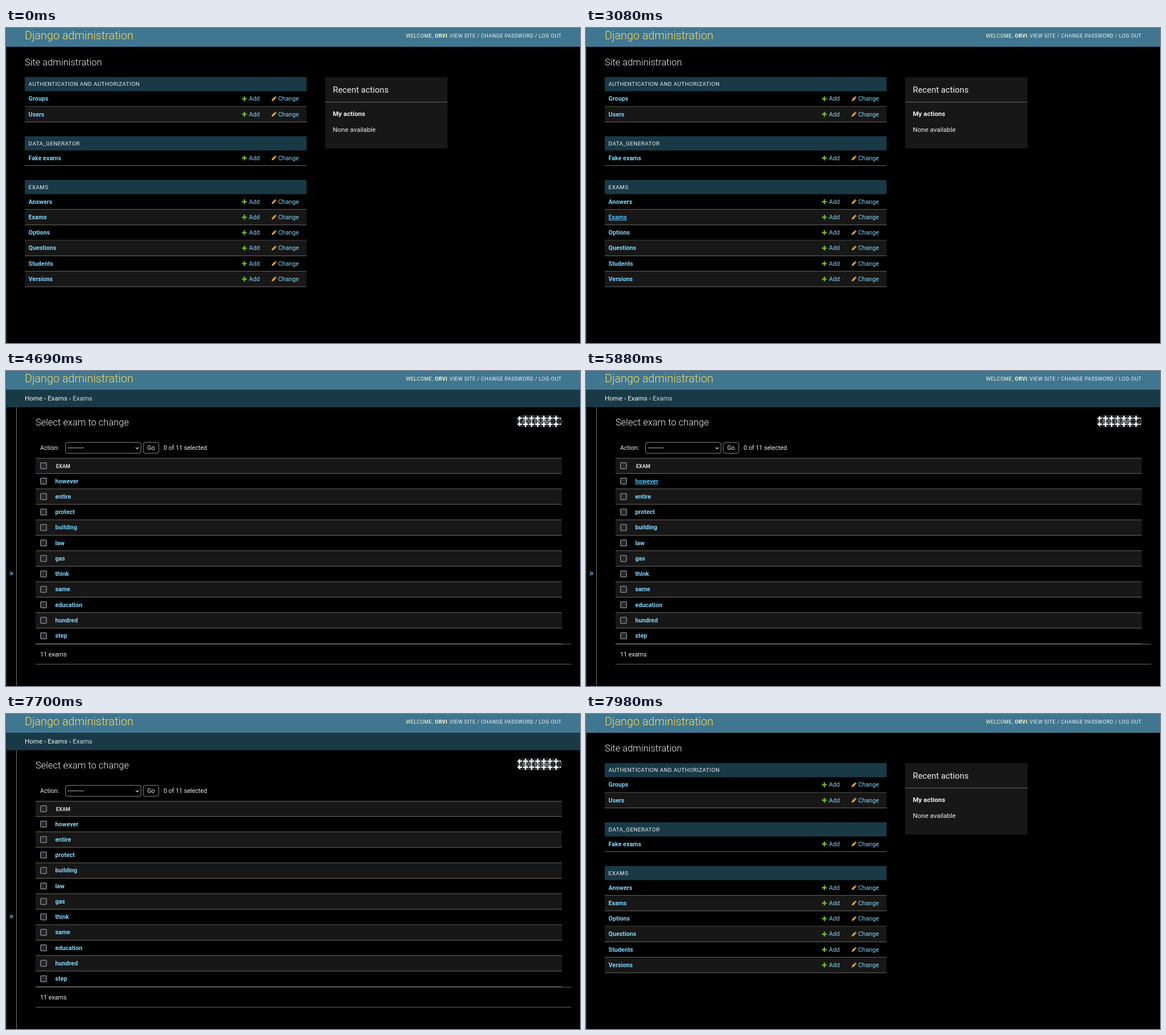
An HTML page that plays this animation: 1009x555 px, repeating every 8 s.

```html
<!DOCTYPE html>
<html lang="en">
<head>
<meta charset="utf-8">
<title>Exam admin</title>
<style>
html, body { margin: 0; width: 100%; height: 100%; overflow: hidden; background: #000; }
svg { display: block; width: 1009px; height: 555px; }
text { font-family: Roboto, "Liberation Sans", sans-serif; white-space: pre; }
</style>
</head>
<body>
<svg id="stage" viewBox="0 0 1009 555"></svg>
<script>
const K = 0.8258; // page zoom
const ROW = 33 * K;
const C = {
  text: '#eeeeee', link: '#81d4fa', linkHot: '#4ac1f7', line: '#77736a',
  edge: '#8c8c8c', bar: '#417690', dark: '#1a3947', panel: '#171717',
  crumb: '#f7f7f7', crumbHot: '#c4dce8', accent: '#f5dd5d', cream: '#ffffcc'
};
const stage = document.getElementById('stage');

function el(parent, tag, attrs = {}, content) {
  const node = document.createElementNS('http://www.w3.org/2000/svg', tag);
  for (const key in attrs) node.setAttribute(key, attrs[key]);
  if (content !== undefined) node.textContent = content;
  parent.appendChild(node);
  return node;
}
const group = () => el(stage, 'g');
const rect = (g, x, y, width, height, fill, more = {}) =>
  el(g, 'rect', { x, y, width, height, fill, ...more });
const path = (g, d, stroke, width = 1, more = {}) =>
  el(g, 'path', { d, stroke, 'stroke-width': width, fill: 'none', ...more });
const hline = (g, x1, x2, y) => rect(g, x1, y - 0.45, x2 - x1, 0.9, C.line);
// size is in page pixels, before zoom
const text = (g, x, y, str, size = 13, weight = 400, fill = C.text, more = {}) =>
  el(g, 'text', { x, y, 'font-size': size * K, 'font-weight': weight, fill, ...more }, str);
const spaced = { 'letter-spacing': 0.5 * K };
const span = (t, str, fill, weight = 400) => el(t, 'tspan', { fill, 'font-weight': weight }, str);
const field = (g, x, y, w, h) => rect(g, x, y, w, h, '#000', { rx: 3.3, stroke: C.edge });

function plus(g, x, y, r, width, color) {
  return path(g, `M${x - r} ${y}h${2 * r}M${x} ${y - r}v${2 * r}`, color, width);
}

function pencil(g, x, y) {
  const p = el(g, 'g', { transform: `translate(${x} ${y}) rotate(45)`, fill: '#efb13c' });
  el(p, 'path', { d: 'M-1.7-5.2h3.4v1.5h-3.4zM-1.7-3.1h3.4v5.6L0 5.6l-1.7-3.1z' });
  el(p, 'path', { d: 'M-.3-2.4v5', stroke: '#8a5f14', 'stroke-width': 0.6 });
}

function header() {
  const g = group();
  rect(g, 0, 0, 1009, 33.2, C.bar);
  text(g, 33, 20.3, 'Django administration', 24, 300, C.accent);
  const hello = text(g, 703, 16.8, '', 11, 400, C.cream, spaced);
  span(hello, 'WELCOME, ', C.cream);
  span(hello, 'ORVI', C.cream, 700);
  span(hello, '.', C.cream);
  const tools = text(g, 976.6, 16.8, '', 11, 300, C.crumb, { ...spaced, 'text-anchor': 'end' });
  ['VIEW SITE', 'CHANGE PASSWORD', 'LOG OUT'].forEach((name, i) => {
    if (i) span(tools, ' / ', C.cream);
    span(tools, name, '#eef3f5');
  });
  rect(g, 0, 33.2, 1, 522, '#3a3a3a');
}

function indexPage() {
  const g = group(), links = {};
  text(g, 33, 65.6, 'Site administration', 20, 300);
  let y = 86.4;
  const apps = [
    ['AUTHENTICATION AND AUTHORIZATION', 'Groups', 'Users'],
    ['DATA_GENERATOR', 'Fake exams'],
    ['EXAMS', 'Answers', 'Exams', 'Options', 'Questions', 'Students', 'Versions']
  ];
  for (const [title, ...models] of apps) {
    rect(g, 33, y, 495.4, 25, C.dark);
    text(g, 39.6, y + 15.9, title, 12, 400, C.text, spaced);
    y += 25;
    models.forEach((name, i) => {
      if (i % 2) rect(g, 33, y, 495.4, ROW, C.panel);
      hline(g, 33, 528.4, y + ROW - 0.4);
      const base = y + 16.9;
      links[name] = text(g, 39.6, base, name, 13, 700, C.link);
      plus(g, 419, y + 13.3, 4.2, 2.3, '#70bf2b');
      text(g, 427, base, 'Add', 13, 400, C.link);
      pencil(g, 470.8, y + 13.6);
      text(g, 478.5, base, 'Change', 13, 400, C.link);
      y += ROW;
    });
    y += 24.8;
  }
  rect(g, 561, 86.4, 215, 125.8, C.panel);
  text(g, 574.5, 113.7, 'Recent actions', 18);
  hline(g, 561, 776, 130.6);
  text(g, 574.5, 155.2, 'My actions', 14, 700);
  text(g, 574.5, 183.2, 'None available', 14);
  return { g, links };
}

// breadcrumb bar, collapsed sidebar and title shared by the inner pages
function innerPage(title, ...trail) {
  const g = group(), links = {};
  rect(g, 0, 33.2, 1009, 30.6, C.dark);
  const bar = text(g, 33, 52.4, '', 14);
  trail.forEach((name, i) => {
    if (i) span(bar, ' › ', C.crumbHot);
    const crumb = span(bar, name, i < trail.length - 1 ? C.crumb : C.crumbHot);
    if (!i) links[name] = crumb;
  });
  rect(g, 18, 63.8, 1, 492, C.line);
  text(g, 9.3, 361, '»', 20, 400, C.link, { 'text-anchor': 'middle' });
  text(g, 52, 96, title, 20, 300);
  return { g, links };
}

function addButton(g) {
  const clip = el(el(stage, 'defs'), 'clipPath', { id: 'pill' });
  rect(clip, 897.5, 78, 79.5, 21, '#000', { rx: 10.5 });
  rect(g, 897.5, 78, 79.5, 21, '#25292b', { rx: 10.5 });
  const tiles = el(g, 'g', { 'clip-path': 'url(#pill)' });
  for (let i = 0; i < 8; i++)
    for (let j = 0; j < 2; j++)
      plus(tiles, 902.5 + 13 * K * i, 83.2 + 13 * K * j, 4.5, 2.3, '#fff');
  text(g, 907, 91.9, 'ADD EXAM', 11, 400, '#c4c4c4', spaced);
}

const checkbox = (g, y) =>
  rect(g, 60.7, y - 5.4, 10.6, 10.8, '#26262a', { rx: 1.6, stroke: '#8d9095', 'stroke-width': 1.3 });

function listPage() {
  const page = innerPage('Select exam to change', 'Home', 'Exams', 'Exams');
  const { g, links } = page;
  addButton(g);
  text(g, 60, 139, 'Action:');
  field(g, 104.7, 125.8, 132.6, 19.2);
  text(g, 108.3, 138.8, '---------', 14);
  path(g, 'M228.1 134.6l2.5 2.6 2.5-2.6', C.text, 1.2);
  field(g, 241.3, 125.8, 27.3, 19.2);
  text(g, 255, 139, 'Go', 13, 400, C.text, { 'text-anchor': 'middle' });
  text(g, 277, 138.8, '0 of 11 selected');

  rect(g, 52, 153.6, 925, ROW, C.panel);
  hline(g, 52, 977, 153.8);
  checkbox(g, 167);
  text(g, 88, 170.6, 'EXAM', 11, 700, '#dcdcdc');
  const names = ['however', 'entire', 'protect', 'building', 'law', 'gas', 'think',
    'same', 'education', 'hundred', 'step'];
  names.forEach((name, i) => {
    const y = 180.75 + ROW * i;
    if (i % 2) rect(g, 52, y, 925, ROW, C.panel);
    hline(g, 52, 977, y - 0.3);
    const box = checkbox(g, y + 13.3);
    if (name === 'gas') page.hotBox = box;
    links[name] = text(g, 86.5, y + 16.9, name, 13, 700, C.link);
  });
  hline(g, 52, 977, 480.2);
  hline(g, 52, 993.5, 481.3);
  text(g, 60, 502.6, '11 exams');
  hline(g, 52, 993.5, 516.6);
  return page;
}

function editPage() {
  const page = innerPage('Change exam', 'Home', 'Exams', 'Exams', 'however');
  const { g } = page;
  const mid = { 'text-anchor': 'middle' };
  rect(g, 917.3, 100, 59.6, 21.4, '#25292b', { rx: 10.7 });
  text(g, 927, 114, 'HISTORY', 11, 400, C.text, spaced);
  text(g, 52, 128.7, 'however', 16, 700);

  text(g, 60, 164, 'Name:', 13, 700);
  field(g, 200.8, 147.4, 225.6, 22.4);
  text(g, 206.2, 162.3, 'however');
  text(g, 60, 206, 'Duration:', 13, 700);
  field(g, 200.8, 189.4, 64.6, 22.4);
  text(g, 206.2, 204.4, '115');
  rect(g, 245.5, 193.3, 14, 15, '#3a3a3d', { rx: 1.5 });
  path(g, 'M250 198.6l2.5-2.6 2.5 2.6M250 203.1l2.5 2.6 2.5-2.6', '#d5d5d5', 1.1);
  [['Backspace allowed', 239.8], ['Active', 275.7]].forEach(([name, y]) => {
    rect(g, 60.3, y - 5.7, 11.4, 11.4, '#1a80f5', { rx: 2 });
    path(g, `M63 ${y + 0.3}l2.1 2.4 3.9-5.5`, '#fff', 1.6);
    text(g, 76, y + 4.1, name);
  });
  [180.6, 222.6, 258.6, 294.5].forEach(y => hline(g, 52, 977, y));

  rect(g, 52.5, 320.3, 924, 49.4, C.panel, { rx: 3.3, stroke: C.line });
  rect(g, 64.8, 331, 57.4, 28.4, '#981313', { rx: 3, stroke: '#6e1010' });
  text(g, 93.4, 349, 'Delete', 14, 400, C.text, mid);
  [
    ['Save and add another', 625.3, 127.6, C.dark],
    ['Save and continue editing', 760, 147, C.dark],
    ['SAVE', 913.6, 51, '#2f5c74']
  ].forEach(([name, x, w, fill]) => {
    rect(g, x, 330.5, w, 29, fill, { rx: 3.3 });
    text(g, x + w / 2, 348.8, name, 13, 400, C.text, mid);
  });
  return page;
}

header();
const index = indexPage(), list = listPage(), edit = editPage();
const pages = [index, list, edit];

const LOOP = 8000, TICK = 70, FADE = 210;
const visits = [[0, index], [3290, list], [6090, edit], [7700, list], [7770, index]];
// element, pointer enters, pointer leaves, pressed at, colours
const hovers = [
  [index.links.Exams, 2800, 3290, 3080],
  [list.links.building, 4690, 4760],
  [list.links.protect, 4760, 4900],
  [list.links.entire, 4900, 4970],
  [list.links.however, 5530, 6090, 5880],
  [edit.links.Home, 6580, 6860, 0, C.crumb, C.crumbHot]
];

const channels = hex => [1, 3, 5].map(i => parseInt(hex.slice(i, i + 2), 16));
function mix(a, b, p) {
  const to = channels(b);
  return `rgb(${channels(a).map((v, i) => Math.round(v + (to[i] - v) * p))})`;
}
const ramp = (t, start) => Math.max(0, (t - start + TICK) / FADE);

function draw(ms) {
  const t = Math.floor(ms / TICK) * TICK;
  const current = visits.filter(v => v[0] <= t).pop()[1];
  for (const p of pages) p.g.setAttribute('display', p === current ? 'inline' : 'none');
  for (const [node, on, off, press, cold = C.link, hot = C.linkHot] of hovers) {
    const rise = t < on ? 0 : Math.min(1, ramp(Math.min(t, off - TICK), on));
    const heat = Math.max(0, rise - (t < off ? 0 : ramp(t, off)));
    node.setAttribute('fill', mix(cold, hot, heat));
    node.setAttribute('text-decoration', press && t >= press && t < off ? 'underline' : 'none');
  }
  list.hotBox.setAttribute('stroke', t < 3850 ? '#d2d4d8' : '#8d9095');
}

const began = performance.now();
function frame() {
  draw((performance.now() - began) % LOOP);
  requestAnimationFrame(frame);
}
frame();
</script>
</body>
</html>
```
